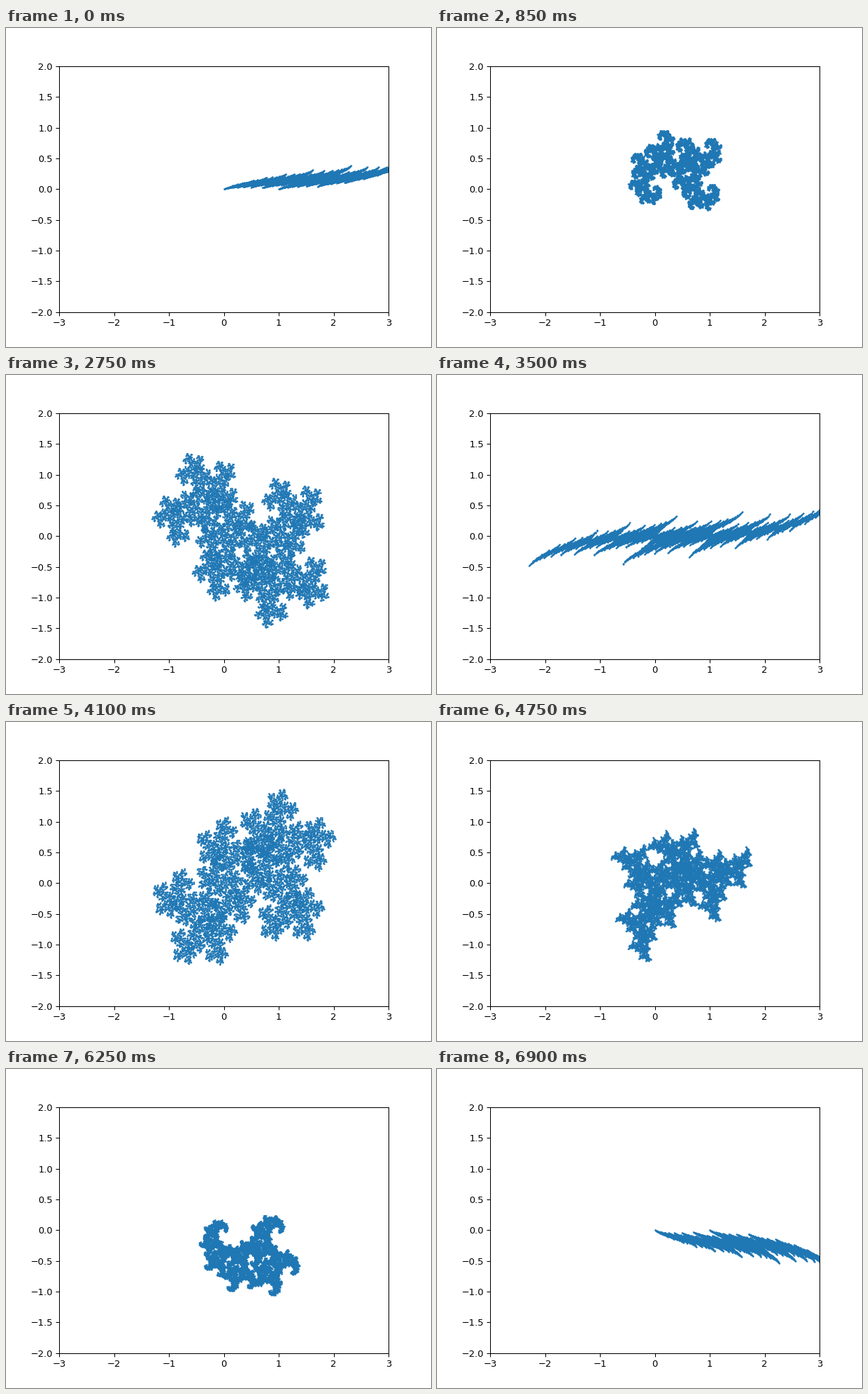
A matplotlib script that plays this animation: 600 px wide and 450 px high, repeating every 6950 ms.

```python
import numpy as np
import matplotlib.pyplot as plt
from matplotlib.animation import FuncAnimation

FRAMES = 139
RATIO = 1 / np.sqrt(2)
DEPTH = 13
STEP = 0.03


def attractor(theta):
    """Points of the two-map system z -> c z and z -> 1 + d z."""
    c = RATIO * np.exp(1j * theta)
    d = RATIO * np.exp(2j * theta)
    z = np.zeros(1, dtype=complex)
    for _ in range(DEPTH):
        z = np.concatenate([c * z, 1 + d * z])
    return z


def angle(i):
    # Angle steps alternate between two and one units per frame.
    return STEP * ((3 * i + 3) // 2)


fig, ax = plt.subplots(figsize=(6.4, 4.8), dpi=93.75)
ax.set_xlim(-3, 3)
ax.set_ylim(-2, 2)
dots, = ax.plot([], [], "o", ms=1, color="#1f77b4")


def update(i):
    z = attractor(angle(i))
    dots.set_data(z.real, z.imag)
    return dots,


anim = FuncAnimation(fig, update, frames=FRAMES, interval=50,
                     repeat=True, repeat_delay=0)
plt.show()
```
